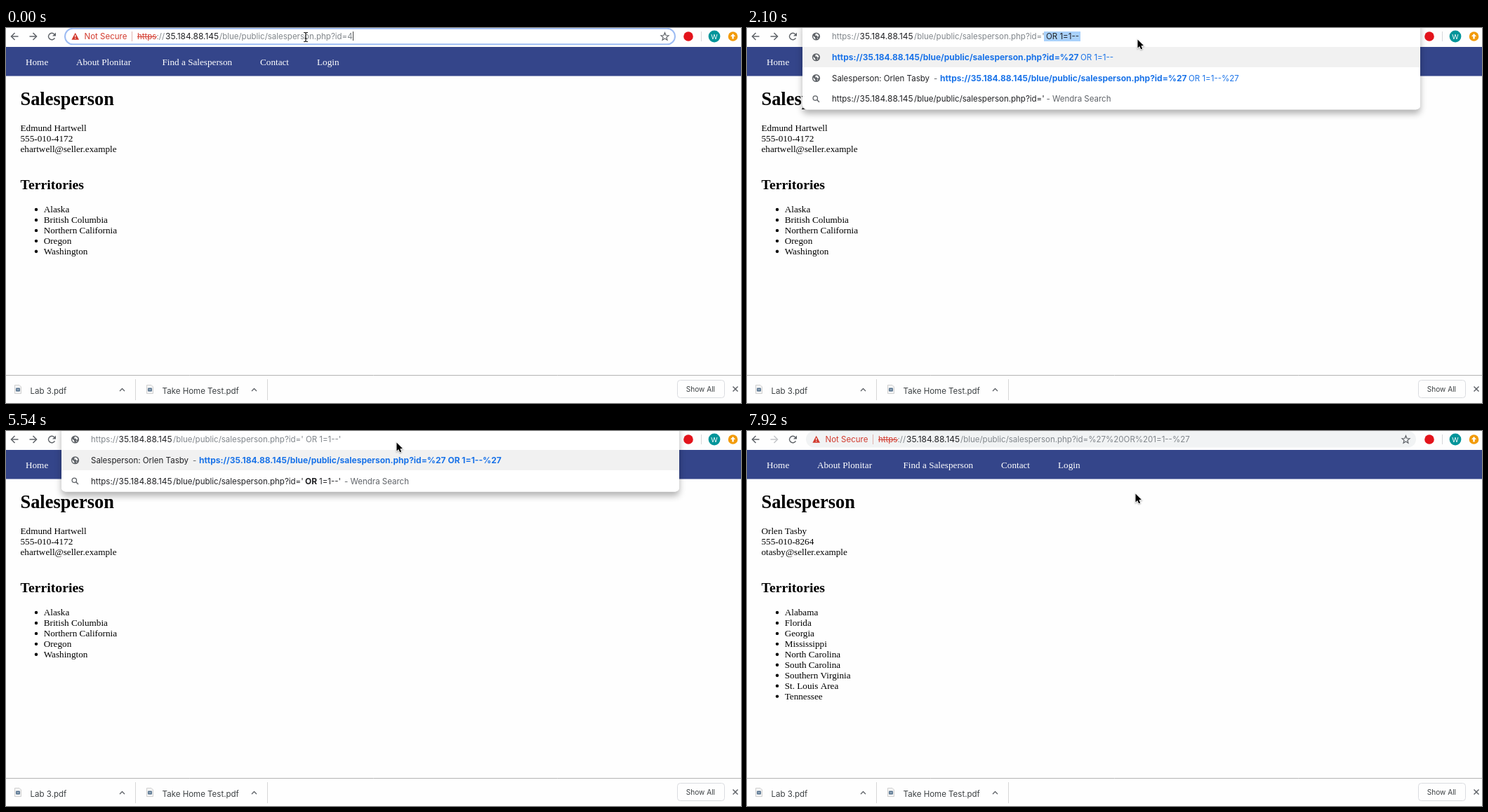
An HTML page with a canvas for the animation above (8000 ms loop, 1047 by 535 pixels).

```html
<!DOCTYPE html>
<html lang="en">
<head>
<meta charset="utf-8">
<title>Salesperson page</title>
<style>
html, body { margin: 0; width: 100%; height: 100%; overflow: hidden; background: #fefefe; }
canvas { display: block; }
</style>
</head>
<body>
<canvas id="stage" width="1047" height="535"></canvas>
<script>
const ctx = document.getElementById('stage').getContext('2d');
const LOOP = 8000;
const UI = 'Inter, Roboto, sans-serif';
const SERIF = '"Liberation Serif", "Noto Serif", serif';
const REG = `11.5px ${UI}`, DIGITS = `12px ${UI}`, BOLD = `bold 12px ${UI}`, BODY = `13.2px ${SERIF}`;
const INK = '#202124', GRAY = '#80868b', ICON = '#5f6368', BLUE = '#1a73e8', RED = '#d23a2e';
const HOST = '35.184.88.145', PATH = '/blue/public/salesperson.php?id=';
const URL_BASE = 'https://' + HOST + PATH;
const ROW = 29.75, TOP = 12;

const people = [
  { lines: ['Edmund Hartwell', '555-010-4172', 'ehartwell@seller.example'],
    areas: ['Alaska', 'British Columbia', 'Northern California', 'Oregon', 'Washington'] },
  { lines: ['Orlen Tasby', '555-010-8264', 'otasby@seller.example'],
    areas: ['Alabama', 'Florida', 'Georgia', 'Mississippi', 'North Carolina', 'South Carolina',
      'Southern Virginia', 'St. Louis Area', 'Tennessee'] }
];

// Pointer keys: time, x, y
const beamPath = [[0, 427, 13], [140, 402, 12], [290, 377, 12], [450, 392, 11], [600, 438, 12],
  [750, 492, 14], [900, 537, 16], [1060, 557, 17]];
const arrowPath = [[2100, 556, 16], [6280, 548, 24], [6450, 490, 54], [6600, 365, 115], [6750, 229, 185],
  [6890, 115, 292], [7040, 32, 380], [7190, 1, 401], [7340, 50, 365], [7480, 150, 240],
  [7630, 288, 108], [7780, 462, 92], [7920, 553, 89]];

const latest = (keys, t) => keys.reduce((hit, key) => key[0] <= t ? key : hit, keys[0]);
const within = (t, from, to) => t >= from && t < to;

function text(str, x, y, font, color) {
  ctx.font = font;
  ctx.fillStyle = color;
  ctx.fillText(str, x, y);
}
function rect(x, y, w, h, color) {
  ctx.fillStyle = color;
  ctx.fillRect(x, y, w, h);
}
function disc(x, y, r, color) {
  ctx.fillStyle = color;
  ctx.beginPath();
  ctx.arc(x, y, r, 0, 7);
  ctx.fill();
}
function trace(points, close) {
  ctx.beginPath();
  points.forEach(([x, y]) => ctx.lineTo(x, y));
  if (close) ctx.closePath();
}
function line(points, color, width = 1, close) {
  trace(points, close);
  ctx.strokeStyle = color;
  ctx.lineWidth = width;
  ctx.stroke();
}
function poly(points, color) {
  trace(points, true);
  ctx.fillStyle = color;
  ctx.fill();
}
function box(x, y, w, h, r, fill, stroke, width = 1) {
  ctx.beginPath();
  ctx.roundRect(x, y, w, h, r);
  if (fill) { ctx.fillStyle = fill; ctx.fill(); }
  if (stroke) { ctx.strokeStyle = stroke; ctx.lineWidth = width; ctx.stroke(); }
}

function drawPage(person) {
  rect(0, 0, 1047, 535, '#fefefe');
  rect(0, 27, 1047, 41.5, '#34458a');
  [['Home', 28], ['About Plonitar', 100], ['Find a Salesperson', 222.5], ['Contact', 362], ['Login', 443]]
    .forEach(([label, x]) => text(label, x, 53, BODY, '#fff'));
  text('Salesperson', 20.5, 110, `bold 26.4px ${SERIF}`, '#000');
  person.lines.forEach((s, i) => text(s, 20.5, 147 + i * 15, BODY, '#000'));
  text('Territories', 20.5, 229.5, `bold 19.8px ${SERIF}`, '#000');
  person.areas.forEach((s, i) => {
    const y = 263 + i * 14.95;
    disc(43, y - 4, 2.2, '#000');
    text(s, 53.7, y, BODY, '#000');
  });
}

function navArrow(x, dir, color) {
  line([[x - 5 * dir, 12], [x + 5 * dir, 12]], color, 1.5);
  line([[x, 7], [x - 5 * dir, 12], [x, 17]], color, 1.5);
}

function drawToolbar(canForward) {
  rect(0, 0, 1047, 27, '#fefefe');
  navArrow(12.5, 1, ICON);
  navArrow(38.5, -1, canForward ? ICON : '#c3c5c8');
  ctx.beginPath();
  ctx.arc(65.3, 12, 4.7, 0.5, 5.5);
  ctx.strokeStyle = ICON;
  ctx.lineWidth = 1.5;
  ctx.stroke();
  poly([[71, 6.5], [71, 11.5], [66, 11.5]], ICON);
  line([[990.5, 5], [990.5, 19]], '#d5d7da');
  disc(972, 12, 6.8, '#e3131b');
  disc(1009, 12, 8.4, '#00959a');
  ctx.textAlign = 'center';
  text('W', 1009, 15.5, `9.5px ${UI}`, '#fff');
  ctx.textAlign = 'left';
  disc(1035.5, 12, 6.8, '#f29b0b');
  poly([[1035.5, 8], [1039, 12], [1036.7, 12], [1036.7, 15.5], [1034.3, 15.5], [1034.3, 12], [1032, 12]], '#fff');
}

function drawAddress(query, focused) {
  if (focused) box(84, 0.7, 869, 22.6, 11.3, '#fff', '#9dbcf3', 2);
  else box(84, 0, 869, 23.5, 11.7, '#f1f3f4');
  poly([[98.7, 6.8], [104, 16.7], [93.4, 16.7]], RED);
  rect(98.1, 10, 1.2, 3, '#fff');
  rect(98.1, 14, 1.2, 1.2, '#fff');
  text('Not Secure', 111.5, 16, REG, RED);
  line([[179.5, 5], [179.5, 19]], '#dfb3ae');
  text('https', 187, 16, REG, RED);
  line([[187, 12.5], [215, 12.5]], RED);
  text('://', 214.5, 16, REG, GRAY);
  text(HOST, 227, 16, DIGITS, INK);
  text(PATH + query, 304, 16, REG, GRAY);
  const star = Array.from({ length: 10 }, (_, i) => {
    const a = i * Math.PI / 5 - Math.PI / 2, r = i % 2 ? 2.5 : 5.8;
    return [938.5 + r * Math.cos(a), 12.5 + r * Math.sin(a)];
  });
  line(star, ICON, 1.2, true);
}

function drawShelf() {
  rect(0, 495, 1047, 40, '#fefefe');
  line([[0, 495.5], [1047, 495.5]], '#b3b3b3');
  [['Lab 3.pdf', 12, 184.5], ['Take Home Test.pdf', 200, 372.5]].forEach(([name, x, edge]) => {
    poly([[x, 509], [x + 7, 509], [x + 10, 512], [x + 10, 522], [x, 522]], '#f5f5f5');
    line([[x + .5, 509.5], [x + 7, 509.5], [x + 9.5, 512], [x + 9.5, 521.5], [x + .5, 521.5]], '#cfcfcf', 1, true);
    box(x + 2, 513.5, 6, 5, 1, '#53708c');
    line([[x + 3, 516], [x + 7, 516]], '#c9d5df');
    text(name, x + 22.6, 521.7, REG, '#3c4043');
    line([[edge - 22.5, 518], [edge - 19, 514.5], [edge - 15.5, 518]], ICON, 1.3);
    line([[edge, 501], [edge, 531]], '#d6d6d6');
  });
  box(956.5, 502.5, 67, 25, 4, '#fefefe', '#dadce0');
  text('Show All', 968.8, 519, `10.1px ${UI}`, '#3c4043');
  line([[1035.5, 511.5], [1042.5, 518.5]], ICON, 1.5);
  line([[1042.5, 511.5], [1035.5, 518.5]], ICON, 1.5);
}

function globe(y) {
  disc(98.5, y, 5.6, ICON);
  poly([[94.2, y - 1], [97, y + 1.5], [97.5, y + 4.3], [94.8, y + 2.5]], '#fff');
  poly([[98, y - 4.2], [101, y - 3.3], [102.5, y - .5], [100.5, y + .7], [99.5, y - 1.2], [97, y - 1.3]], '#fff');
  poly([[99.5, y + 1.8], [101.5, y + 2], [100.3, y + 3.5]], '#fff');
}
function magnifier(y) {
  ctx.beginPath();
  ctx.arc(97.3, y - 1.2, 3.2, 0, 7);
  ctx.strokeStyle = ICON;
  ctx.lineWidth = 1.3;
  ctx.stroke();
  line([[99.7, y + 1.2], [103, y + 4.5]], ICON, 1.5);
}

// Text runs: [text, x, font, color]
const bold = (s, x = 121) => [s, x, BOLD, BLUE];
const link = (s, x) => [s, x, REG, BLUE];
const plain = (s, x = 121) => [s, x, REG, INK];
const faint = (s, x) => [s, x, REG, ICON];
const address = (query, color) =>
  [['https://', 121, REG, color], [HOST, 160.5, DIGITS, INK], [PATH + query, 238, REG, color]];
const titled = [plain('Salesperson: Orlen Tasby'), faint('-', 266)];
const OR = ['OR', 426, BOLD, INK];

const row = (...runs) => ({ icon: globe, runs });
const searchRow = (x, ...runs) =>
  ({ icon: magnifier, runs: [...address("'", INK), ...runs, faint('- Wendra Search', x)] });

const lists = {
  open: [
    row(bold(URL_BASE)),
    row(bold(URL_BASE), link('%27 OR 1=1--', 446.5)),
    row(...titled, bold(URL_BASE, 275), link('%27 OR 1=1--%27', 600.5)),
    row(plain('Find a Salesperson'), faint('-', 228), bold(URL_BASE, 237), link('1000', 562.5)),
    row(bold(URL_BASE), link('5', 446.5)),
    row(bold(URL_BASE), link('100', 446.5))
  ],
  quote: [
    row(bold(URL_BASE + '%27'), link('OR 1=1--', 475)),
    row(...titled, bold(URL_BASE + '%27', 275), link('OR 1=1--%27', 629)),
    searchRow(426.5)
  ],
  accepted: [
    row(bold(URL_BASE + '%27 OR 1=1--')),
    row(...titled, bold(URL_BASE + '%27 OR 1=1--', 275), link('%27', 680.5)),
    searchRow(479, OR, plain('1=1--', 446))
  ],
  closed: [
    row(...titled, bold(URL_BASE + '%27 OR 1=1--%27', 275)),
    searchRow(482, OR, plain("1=1--'", 446))
  ]
};

function drawPanel(bottom, alpha) {
  const x = 79, w = 880;
  ctx.save();
  // Keep the shadow outside the translucent panel
  ctx.beginPath();
  ctx.rect(0, 0, 1047, 535);
  ctx.roundRect(x, -10, w, bottom + 10, 6);
  ctx.clip('evenodd');
  ctx.shadowColor = 'rgba(0,0,0,.3)';
  ctx.shadowBlur = 10;
  ctx.shadowOffsetY = 6;
  box(x, -10, w, bottom + 10, 6, '#fff');
  ctx.restore();

  rect(x, 0, w, 27, '#fff');
  ctx.save();
  ctx.globalAlpha = alpha;
  rect(x, 27, w, 29, '#f1f1f1');
  box(x, 56, w, bottom - 56, [0, 0, 6, 6], '#fff');
  ctx.restore();
}

function drawPopup(rows, typed, caret, selected, alpha) {
  const drawRuns = (runs, y) => runs.forEach(([s, x, font, color]) => text(s, x, y + 4, font, color));
  drawPanel(TOP + ROW * rows.length + 15, alpha);
  globe(TOP);
  drawRuns(address(typed, GRAY), TOP);
  if (selected) {
    rect(423, 5, 52, 14, '#a9d1fb');
    text('OR 1=1--', 426, 16, REG, INK);
  }
  if (caret) rect(caret, 5, 1, 13, '#444');
  rows.forEach(({ icon, runs }, i) => {
    const y = TOP + ROW * (i + 1);
    icon(y);
    drawRuns(runs, y);
  });
}

function drawStatus(alpha) {
  ctx.save();
  ctx.globalAlpha = alpha;
  box(-5, 478.5, 350.5, 20, 3, '#f8f8f8', '#c8c8c8');
  text('Processing request...', -1.5, 490.5, `9.5px ${UI}`, '#70757a');
  ctx.restore();
}

function drawBeam(x, y) {
  const shape = [[[x - 3, y - 6.5], [x - 1, y - 6.5], [x, y - 5.5], [x + 1, y - 6.5], [x + 3, y - 6.5]],
    [[x, y - 5.5], [x, y + 5.5]],
    [[x - 3, y + 6.5], [x - 1, y + 6.5], [x, y + 5.5], [x + 1, y + 6.5], [x + 3, y + 6.5]],
    [[x - 1.5, y + 2], [x + 1.5, y + 2]]];
  shape.forEach(p => line(p, '#222', 1.2));
}
function drawArrow(x, y) {
  const p = [[0, 0], [0, 12], [2.7, 9.5], [4.6, 13.8], [6.7, 12.9], [4.8, 8.7], [8.5, 8.5]]
    .map(([dx, dy]) => [x + .5 + dx, y + .5 + dy]);
  ctx.save();
  ctx.shadowColor = 'rgba(0,0,0,.35)';
  ctx.shadowBlur = 2;
  ctx.shadowOffsetY = 1;
  line(p, '#fff', 1.6, true);
  ctx.restore();
  poly(p, '#000');
}

function draw(t) {
  const loaded = t >= 6280, sent = t >= 5980;
  drawPage(people[loaded ? 1 : 0]);
  drawToolbar(!sent);
  drawAddress(sent ? '%27%20OR%201=1--%27' : '4', !sent);
  if (t < 450 || within(t, 1060, 1510)) rect(494, 5, 1, 13, '#444');
  if (within(t, 6130, 6890)) drawStatus(t < 6600 ? 1 : t < 6750 ? .6 : .2);
  drawShelf();

  if (within(t, 1800, 2100)) drawPopup(lists.open, '', 420.5, false, t < 1950 ? .88 : 1);
  else if (within(t, 2100, 3600)) drawPopup(lists.quote, "'", 0, true, 1);
  else if (within(t, 3600, 4040)) drawPopup(t < 3740 ? lists.quote : lists.accepted, "' OR 1=1--", 475, false, 1);
  else if (within(t, 4040, 5980)) {
    const lit = t < 4490 || within(t, 5090, 5540);
    drawPopup(lists.closed, "' OR 1=1--'", lit ? 478 : 0, false, 1);
  }

  const [, x, y] = latest(t < 2100 ? beamPath : arrowPath, t);
  (t < 2100 ? drawBeam : drawArrow)(x, y);
}

const start = performance.now();
function tick() {
  draw((performance.now() - start) % LOOP);
  requestAnimationFrame(tick);
}
tick();
</script>
</body>
</html>
```
